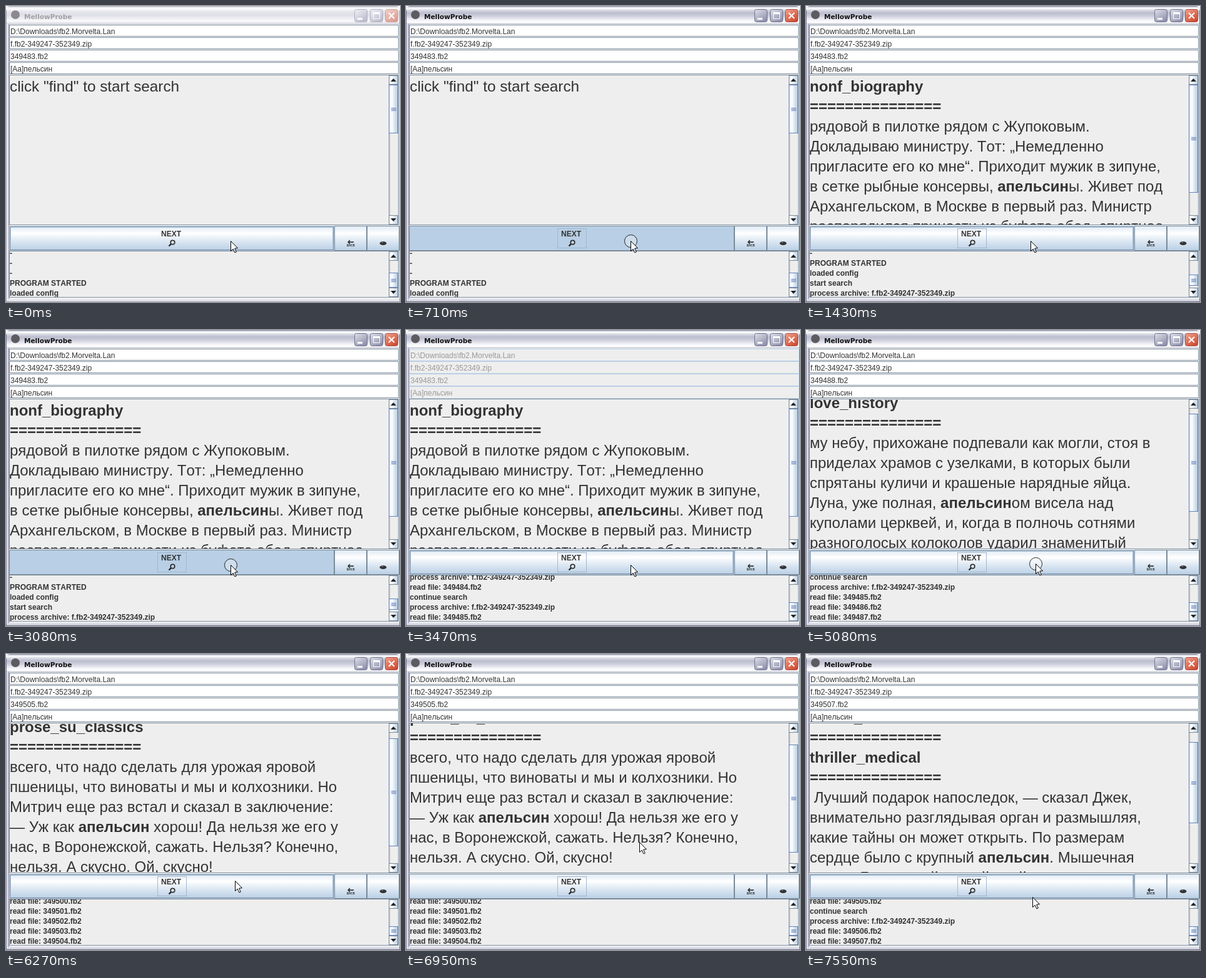
An HTML page with a canvas that plays this animation: 630x474 px, repeating every 8000 ms.

```html
<!DOCTYPE html>
<html lang="ru">
<head>
<meta charset="utf-8">
<title>MellowProbe</title>
<style>
html, body { margin: 0; width: 100%; height: 100%; overflow: hidden; background: #fff; }
canvas { display: block; }
</style>
</head>
<body>
<canvas id="stage" width="630" height="474"></canvas>
<script>
const ctx = document.getElementById('stage').getContext('2d');
ctx.fontKerning = 'none';
const LOOP = 8000;
const SANS = '"Liberation Sans", Arial, sans-serif';
const INK = '#333', EDGE = '#7a8a99', PANEL = '#eee', STEEL = '#b8cfe5', THUMB_EDGE = '#6382bf';
const RULE = '*===============*';

// Asterisks toggle bold; height is the full scrollable height.
const PAGES = {
  intro: { height: 643, size: 24.3, lines: ['click "find" to start search'] },
  biography: { height: 290, size: 24, lines: ['*nonf_biography*', RULE,
    'рядовой в пилотке рядом с Жупоковым.',
    'Докладываю министру. Тот: „Немедленно',
    'пригласите его ко мне“. Приходит мужик в зипуне,',
    'в сетке рыбные консервы, *апельсин*ы. Живет под',
    'Архангельском, в Москве в первый раз. Министр',
    'распорядился принести из буфета обед, спиртное.'] },
  love: { height: 319, size: 24, lines: ['*love_history*', RULE,
    'му небу, прихожане подпевали как могли, стоя в',
    'приделах храмов с узелками, в которых были',
    'спрятаны куличи и крашеные нарядные яйца.',
    'Луна, уже полная, *апельсин*ом висела над',
    'куполами церквей, и, когда в полночь сотнями',
    'разноголосых колоколов ударил знаменитый'] },
  classics: { height: 290, size: 24, lines: ['*prose_su_classics*', RULE,
    'всего, что надо сделать для урожая яровой',
    'пшеницы, что виноваты и мы и колхозники. Но',
    'Митрич еще раз встал и сказал в заключение:',
    '— Уж как *апельсин* хорош! Да нельзя же его у',
    'нас, в Воронежской, сажать. Нельзя? Конечно,',
    'нельзя. А скусно. Ой, скусно!'] },
  thriller: { height: 386, size: 24, lines: ['*action_art*', RULE, '*thriller_medical*', RULE,
    ' Лучший подарок напоследок, — сказал Джек,',
    'внимательно разглядывая орган и размышляя,',
    'какие тайны он может открыть. По размерам',
    'сердце было с крупный *апельсин*. Мышечная',
    'масса. Блестящий тонкий слой'] }
};

const ARCHIVE = 'f.fb2-349247-352349.zip';
const reads = (from, to) =>
  Array.from({ length: to - from + 1 }, (_, i) => `read file: ${from + i}.fb2`);
const RESUME = ['continue search', 'process archive: ' + ARCHIVE];
const LOG = ['-', '-', '-', 'PROGRAM STARTED', 'loaded config', 'start search', RESUME[1],
  ...reads(349484, 349484), ...RESUME, ...reads(349485, 349488), ...RESUME,
  ...reads(349489, 349505), ...RESUME, ...reads(349506, 349507)];

// Each step changes only the listed parts of the state.
const STEPS = [
  [0, { active: false, ring: false, hover: true, pressed: false, click: false, busy: false,
        page: 'intro', scroll: 0, file: 349483, log: 5, mouse: [359, 376] }],
  [710, { active: true, ring: true, pressed: true, click: true }],
  [830, { pressed: false, click: false, busy: true, log: 7 }],
  [1430, { busy: false, page: 'biography' }],
  [3080, { pressed: true, click: true }],
  [3200, { pressed: false, click: false, busy: true }],
  [3340, { log: 10 }],
  [3460, { log: 11 }],
  [3590, { busy: false, page: 'love', file: 349488, log: 13 }],
  [4300, { hover: false, mouse: [387, 276] }],
  [4450, { mouse: [386, 280] }],
  [4570, { scroll: 12 }],
  [4690, { mouse: [381, 302] }],
  [4810, { mouse: [371, 345] }],
  [4930, { hover: true, mouse: [367, 374] }],
  [5080, { click: true }],
  [5230, { pressed: true }],
  [5350, { pressed: false, click: false, busy: true, log: 14 }],
  [5470, { log: 17, mouse: [366, 363] }],
  [5590, { log: 21 }],
  [5740, { log: 23 }],
  [5860, { log: 25 }],
  [6010, { log: 27 }],
  [6130, { log: 30 }],
  [6270, { busy: false, page: 'classics', file: 349505, log: 32 }],
  [6410, { mouse: [366, 359] }],
  [6530, { hover: false, mouse: [368, 347] }],
  [6650, { mouse: [369, 338] }],
  [6800, { mouse: [373, 294] }],
  [6950, { scroll: 27, mouse: [373, 301] }],
  [7100, { hover: true, mouse: [372, 366] }],
  [7250, { mouse: [362, 389] }],
  [7400, { pressed: true }],
  [7550, { pressed: false, page: 'thriller', file: 349507, log: 37 }]
];
const stateAt = time =>
  Object.assign({}, ...STEPS.filter(([start]) => start <= time).map(([, change]) => change));

function rect(x, y, w, h, fill) {
  ctx.fillStyle = fill;
  ctx.fillRect(x, y, w, h);
}
function box(x, y, w, h, edge, fill) {
  rect(x, y, w, h, edge);
  rect(x + 1, y + 1, w - 2, h - 2, fill);
}
// A panel with a white highlight along its right and bottom sides.
function etchedBox(y, h, fill) {
  rect(5, y, 624, h, '#fff');
  box(5, y, 623, h - 1, EDGE, fill);
}
function frame(x, y, w, h, color) {
  ctx.strokeStyle = color;
  ctx.lineWidth = 1;
  ctx.strokeRect(x + 0.5, y + 0.5, w - 1, h - 1);
}
function gradient(x0, y0, x1, y1, stops) {
  const g = ctx.createLinearGradient(x0, y0, x1, y1);
  stops.forEach(([at, color]) => g.addColorStop(at, color));
  return g;
}
function clipped(x, y, w, h, draw) {
  ctx.save();
  ctx.beginPath();
  ctx.rect(x, y, w, h);
  ctx.clip();
  draw();
  ctx.restore();
}
function text(str, x, y, font, color = INK, align = 'left') {
  ctx.font = font;
  ctx.fillStyle = color;
  ctx.textAlign = align;
  ctx.fillText(str, x, y);
}
function richText(str, x, y, size) {
  str.split('*').forEach((part, i) => {
    text(part, x, y, `${i % 2 ? 'bold ' : ''}${size}px ${SANS}`);
    x += ctx.measureText(part).width;
  });
}
function path(points, fill, stroke, width = 1) {
  ctx.beginPath();
  points.forEach(([x, y]) => ctx.lineTo(x, y));
  if (fill) {
    ctx.closePath();
    ctx.fillStyle = fill;
    ctx.fill();
  }
  if (stroke) {
    ctx.strokeStyle = stroke;
    ctx.lineWidth = width;
    ctx.stroke();
  }
}
const ocean = (x0, y0, x1, y1) => gradient(x0, y0, x1, y1,
  [[0, '#dde8f3'], [0.3, '#fff'], [0.6, '#dde8f3'], [1, STEEL]]);

function captionButton(x, kind, active) {
  const close = kind === 'close';
  const [light, dark, edge] = close
    ? (active ? ['#f0a58f', '#cf4a30', '#a8504a'] : ['#f3d3cc', '#dc9b90', '#c9a3a0'])
    : (active ? ['#e2e3ec', '#8f91ab', '#6d6f8c'] : ['#f3f3f8', '#bbbccd', '#b0b1c2']);
  ctx.beginPath();
  ctx.roundRect(x + 0.5, 5.5, 20, 20, 3);
  ctx.fillStyle = gradient(x, 5, x + 14, 26, [[0, light], [1, dark]]);
  ctx.fill();
  ctx.strokeStyle = edge;
  ctx.lineWidth = 1;
  ctx.stroke();
  const glyph = '#fff';
  if (kind === 'min') rect(x + 5, 19, 8, 3, glyph);
  if (kind === 'max') {
    frame(x + 5, 10, 11, 11, glyph);
    rect(x + 5, 10, 11, 3, glyph);
  }
  if (close) {
    path([[x + 6, 11], [x + 15, 20]], null, glyph, 2);
    path([[x + 15, 11], [x + 6, 20]], null, glyph, 2);
  }
}

function drawWindow(active) {
  rect(0, 0, 630, 474, '#fff');
  ctx.beginPath();
  ctx.roundRect(0, 0, 630, 474, [7, 7, 0, 0]);
  ctx.fillStyle = active ? '#c9cad8' : '#dedee7';
  ctx.fill();
  ctx.save();
  ctx.clip();
  rect(0, 0, 630, 29, gradient(0, 0, 0, 29, active
    ? [[0, '#77778f'], [0.05, '#c5c6d6'], [0.12, '#fff'], [0.22, '#dcdde7'], [0.38, '#bcbdce'],
       [0.55, '#cccdda'], [0.8, '#f6f6fa'], [0.92, '#fff'], [1, '#b4b6c7']]
    : [[0, '#a3a3b4'], [0.06, '#e2e2ea'], [0.14, '#fff'], [0.3, '#e6e6ed'], [0.5, '#dfdfe8'],
       [0.85, '#fafafc'], [1, '#cfd0db']]));
  ctx.restore();
  const edge = active ? '#77788f' : '#a2a3b3';
  rect(0, 7, 1, 467, edge);
  rect(1, 28, 1, 443, '#f6f6fa');
  rect(629, 7, 1, 467, edge);
  rect(0, 473, 630, 1, edge);
  rect(1, 470, 628, 1, '#f4f4f8');
  rect(4, 29, 625, 440, PANEL);
  rect(4, 29, 1, 440, '#9d9eae');

  ctx.beginPath();
  ctx.arc(15, 14, 7, 0, Math.PI * 2);
  ctx.fillStyle = active ? '#5e5a62' : '#8c8a90';
  ctx.fill();
  text('MellowProbe', 29, 21, 'bold 10.5px "DejaVu Sans", sans-serif', active ? '#111' : '#a0a0a4');
  captionButton(557, 'min', active);
  captionButton(582, 'max', active);
  captionButton(606, 'close', active);
}

function drawFields({ busy, file }) {
  ['D:\\Downloads\\fb2.Morvelta.Lan', ARCHIVE, file + '.fb2', '[Аа]пельсин'].forEach((value, i) => {
    const y = 30 + 20 * i;
    if (busy) box(5, y, 624, 20, STEEL, PANEL);
    else etchedBox(y, 20, '#fff');
    text(value, 7, y + 15, `12px ${SANS}`, busy ? '#999' : INK);
  });
}

function arrowButton(y, direction) {
  box(612, y, 15, 15, EDGE, ocean(612, y, 627, y));
  const cy = y + 7.5, tip = 2.5 * direction;
  path([[615, cy - tip], [624, cy - tip], [619.5, cy + tip]], '#222');
}
function scrollBar(top, bottom, thumbTop, thumbHeight) {
  rect(612, top, 15, bottom - top, PANEL);
  rect(612, top, 1, bottom - top, EDGE);
  rect(613, top, 2, bottom - top, '#dadada');
  arrowButton(top, -1);
  arrowButton(bottom - 15, 1);
  const y = Math.round(thumbTop), h = Math.round(thumbHeight);
  box(612, y, 15, h, THUMB_EDGE, ocean(613, 0, 626, 0));
  const middle = y + Math.floor(h / 2);
  for (const offset of [-2, 0, 2]) rect(616, middle + offset, 8, 1, THUMB_EDGE);
}

function drawPage({ page, scroll }) {
  const { lines, height, size } = PAGES[page];
  etchedBox(110, 242, PANEL);
  clipped(6, 111, 606, 239, () => lines.forEach((line, i) =>
    richText(line, 6, 137 + 32 * i - scroll, size)));
  const perPixel = 209 / height;
  scrollBar(111, 350, 126 + scroll * perPixel, 240 * perPixel);
}

function drawLog({ log }) {
  etchedBox(392, 76, PANEL);
  clipped(6, 393, 606, 73, () => LOG.slice(log - 5, log).forEach((line, i) =>
    text(line, 6, 400 + 16 * i, `bold 12px ${SANS}`)));
  const [top, height] = log < 6 ? [427, 24] : log < 10 ? [430, 18] : [436, 15];
  scrollBar(393, 466, top, height);
}

function button(x, w, pressed, hover) {
  const y = 352, h = 40;
  box(x, y, w, h, EDGE, pressed ? STEEL : ocean(0, y, 0, y + h));
  if (hover && !pressed)
    [STEEL, EDGE, STEEL].forEach((color, i) => frame(x + i, y + i, w - 2 * i, h - 2 * i, color));
}
function drawButtons({ pressed, hover, ring }) {
  button(5, 520, pressed, hover);
  button(525, 52);
  button(577, 52);
  if (ring) frame(242, 356, 47, 32, '#a3b8cc');
  text('NEXT', 264, 369, `bold 12px ${SANS}`, INK, 'center');

  ctx.beginPath();
  ctx.arc(266.5, 378.5, 3.3, 0, Math.PI * 2);
  ctx.strokeStyle = '#222';
  ctx.lineWidth = 1.6;
  ctx.stroke();
  path([[264, 381], [260.5, 384.5]], null, '#222', 2.4);

  path([[550, 375], [547, 378], [550, 381]], null, '#222', 1.4);
  path([[547, 378], [556, 378]], null, '#222', 1.6);
  text('BACK', 551.5, 384.5, `bold 4.5px ${SANS}`, '#222', 'center');

  ctx.beginPath();
  ctx.ellipse(603, 380, 5.5, 3, 0, 0, Math.PI * 2);
  ctx.fillStyle = '#333';
  ctx.fill();
  rect(601, 378, 2, 1, '#aab');
}

function drawMouse({ mouse: [x, y], click }) {
  if (click) {
    ctx.beginPath();
    ctx.arc(x + 0.5, y + 0.5, 10, 0, Math.PI * 2);
    ctx.fillStyle = 'rgba(255,255,255,.3)';
    ctx.fill();
    ctx.strokeStyle = '#222';
    ctx.lineWidth = 1;
    ctx.stroke();
  }
  const arrow = [[0, 0], [0, 16], [3.7, 12.6], [6.4, 18.4], [8.8, 17.4], [6.2, 11.6], [11, 11.2], [0, 0]];
  path(arrow.map(([dx, dy]) => [x + 0.5 + dx, y + 0.5 + dy]), '#fff', '#000');
}

function render() {
  const state = stateAt(performance.now() % LOOP);
  drawWindow(state.active);
  drawFields(state);
  drawPage(state);
  drawLog(state);
  drawButtons(state);
  drawMouse(state);
  requestAnimationFrame(render);
}
render();
</script>
</body>
</html>
```
